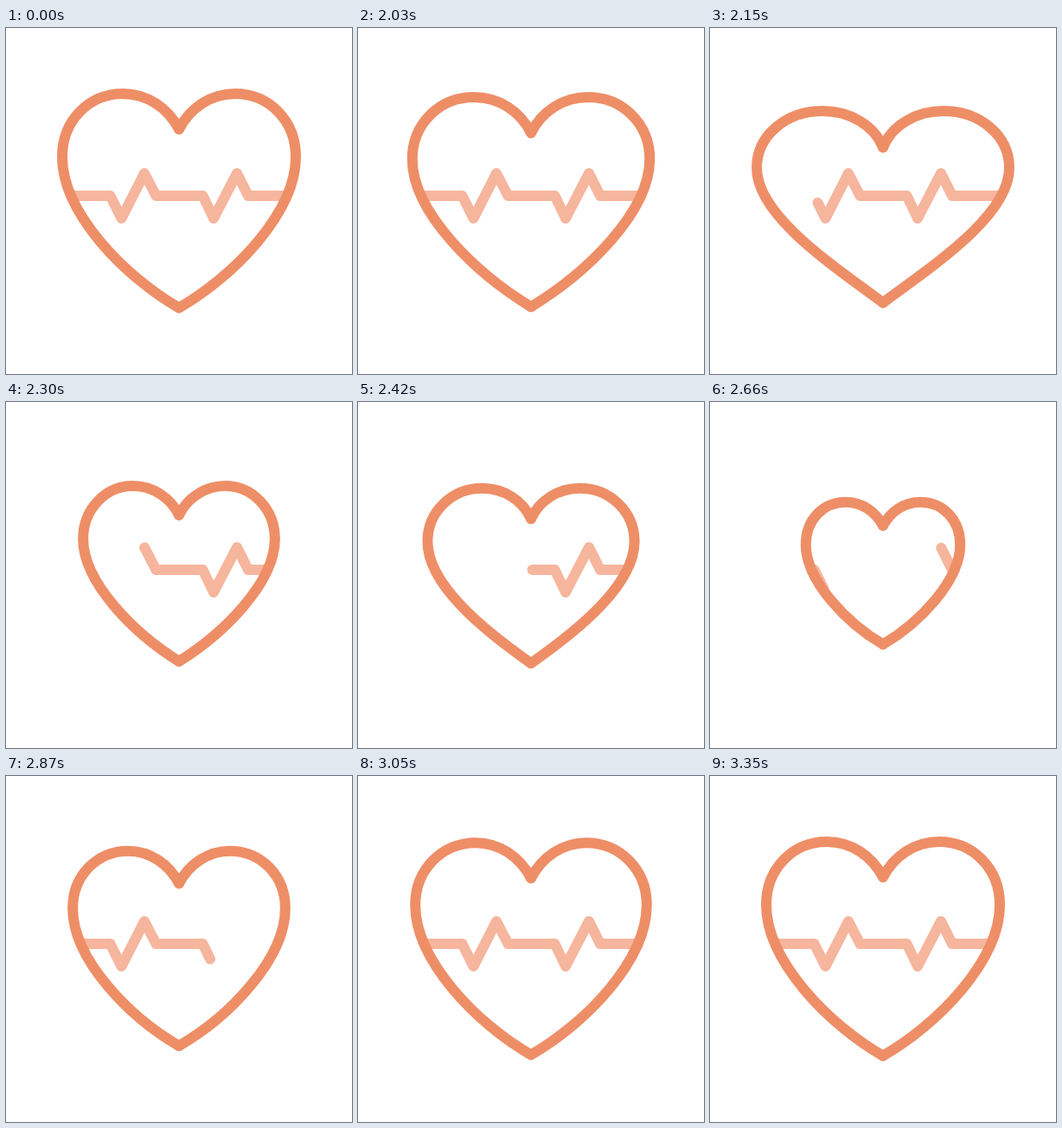
An HTML page without scripts for the animation above (3.71 s loop, 400x400 px).

```html
<!DOCTYPE html>
<html lang="en">
<head>
<meta charset="utf-8">
<title>Heartbeat</title>
<style>
  html, body { margin: 0; width: 100%; height: 100%; overflow: hidden; background: #fff; }
  svg { display: block; width: 100%; height: 100%; }
  .outline, .pulse { fill: none; stroke-width: 12; stroke-linecap: round; stroke-linejoin: round; }
  .outline { stroke: #ee8e67; }
  .pulse { stroke: #f6b59d; stroke-dasharray: 100 300; }
  .half { animation: beat 3710ms linear infinite; }
  .leave { animation: leave 3710ms linear infinite; }
  .enter { animation: enter 3710ms linear infinite; }

  /* Left half of the heart: rest, squash, medium, squash, small, regrow */
  @keyframes beat {
    0%, 53.91%, 90.3%, 100% {
      d: path("M200 117C187 92 163 76 135 76C96 76 65 107 65 149C65 214 138 288 200 323.5");
    }
    58.36% {
      d: path("M200 140C190 114 161 98 130 98C87 98 53 126 53 163C53 217 142 273 200 317");
      animation-timing-function: cubic-bezier(.37, 0, .63, 1);
    }
    62.8% {
      d: path("M200 130C190 110 170 97 148 97C117 97 92 124 92 158C92 209 150 268 200 298.5");
    }
    67.25% {
      d: path("M200 139C190 116 167 102 140 102C101 102 71 130 71 164C71 213 141 260 200 305");
      animation-timing-function: cubic-bezier(.37, 0, .63, 1);
    }
    71.7% {
      d: path("M200 143C191 127 176 116 157 116C131 116 111 136 111 165C111 207 159 256 200 280");
      animation-timing-function: cubic-bezier(.333, .667, .667, 1);
    }
    83.02% {
      d: path("M200 118C187 93 163 77 136 77C97 77 66 108 66 149C66 214 138 287 200 322.5");
      animation-timing-function: ease-out;
    }
  }
  @keyframes leave {
    0%, 53.91% { stroke-dashoffset: 0; }
    62% { stroke-dashoffset: -36.9; }
    77.3%, 100% { stroke-dashoffset: -100; }
  }
  @keyframes enter {
    0%, 68.46% { stroke-dashoffset: 100; }
    83.1%, 100% { stroke-dashoffset: 0; }
  }
</style>
</head>
<body>
<svg viewBox="0 0 400 400">
  <clipPath id="inside">
    <path class="half" d="M200 117C187 92 163 76 135 76C96 76 65 107 65 149C65 214 138 288 200 323.5"/>
    <path class="half" transform="matrix(-1 0 0 1 400 0)" d="M200 117C187 92 163 76 135 76C96 76 65 107 65 149C65 214 138 288 200 323.5"/>
  </clipPath>
  <g clip-path="url(#inside)">
    <path class="pulse leave" pathLength="100" d="M50 194H120.5L133.5 220L160 168L173.5 194H227.5L240 220L267 168L280 194H350"/>
    <path class="pulse enter" pathLength="100" d="M50 194H120.5L133.5 220L160 168L173.5 194H227.5L240 220L267 168L280 194H350"/>
  </g>
  <g class="outline">
    <path class="half" d="M200 117C187 92 163 76 135 76C96 76 65 107 65 149C65 214 138 288 200 323.5"/>
    <path class="half" transform="matrix(-1 0 0 1 400 0)" d="M200 117C187 92 163 76 135 76C96 76 65 107 65 149C65 214 138 288 200 323.5"/>
  </g>
</svg>
</body>
</html>
```
